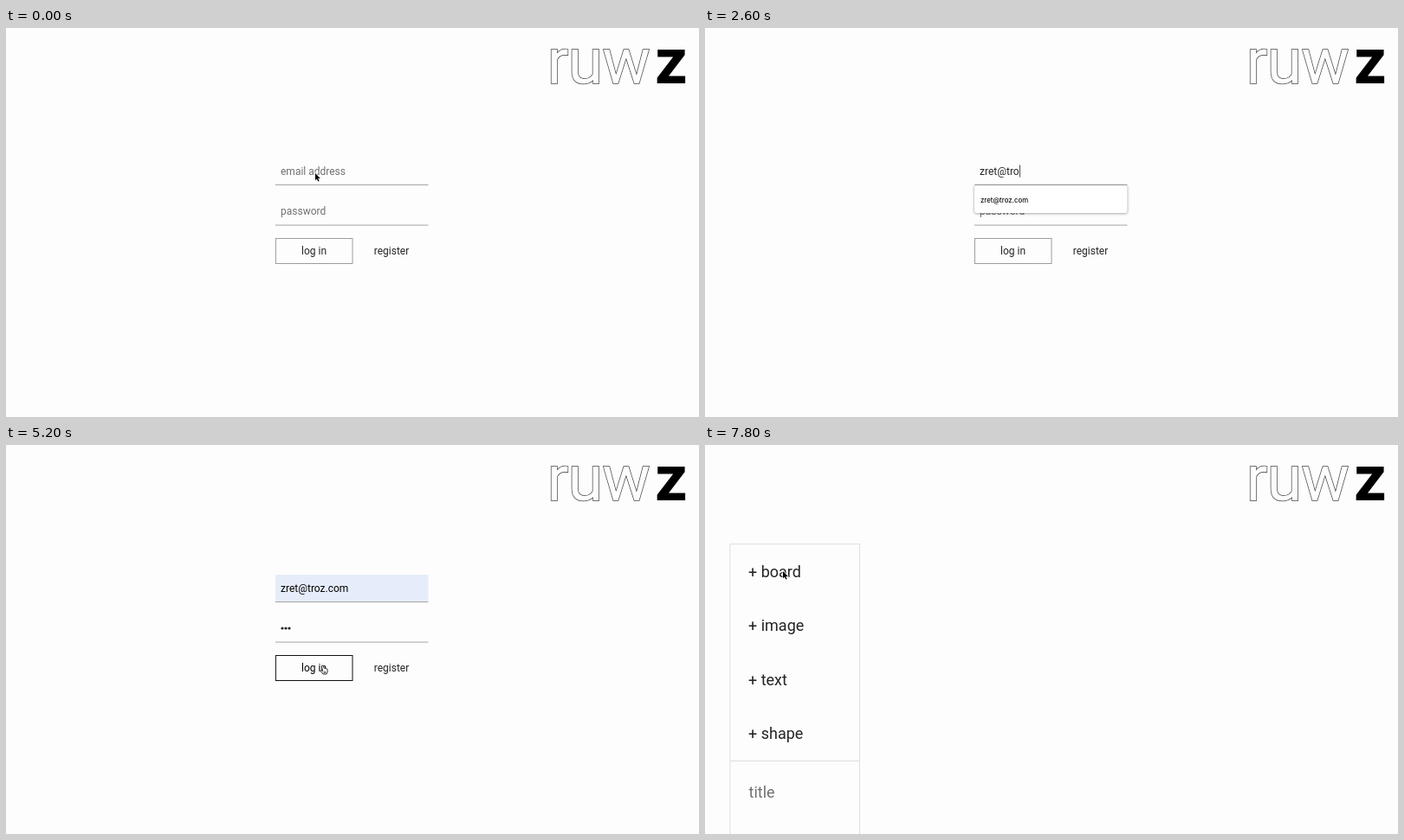
Animation, 800 px wide and 450 px high, one loop 8000 ms. Source, as an HTML page with a canvas:

```html
<!DOCTYPE html>
<html lang="en">
<head>
<meta charset="utf-8">
<title>Board sign-in</title>
<style>
  html, body { margin: 0; width: 100%; height: 100%; overflow: hidden; background: #fdfdfd; }
  canvas { display: block; width: 800px; height: 450px; }
</style>
</head>
<body>
<canvas id="stage"></canvas>
<script>
const LOOP = 8000, STEP = 200;
const PAPER = '#fdfdfd', INK = '#242424', HINT = '#707070', LINE = '#9c9c9c';
const UI = 'Roboto, sans-serif', SYSTEM = 'Inter, sans-serif';
const USER = 'zret@troz.com', OTHER = 'zret@quofi.com';

const canvas = document.getElementById('stage');
const ctx = canvas.getContext('2d');
const ratio = window.devicePixelRatio || 1;
canvas.width = 800 * ratio;
canvas.height = 450 * ratio;

// time, x, y, shape ('' hides the pointer)
const pointer = [
  [0, 357, 168, 'arrow'], [1000, 357, 171, 'beam'], [1200, 0, 0, ''],
  [2800, 372, 204, 'arrow'], [3000, 369, 200, 'arrow'],
  [3200, 369, 202, 'beam'], [3400, 366, 207, 'beam'], [3600, 361, 212, 'beam'],
  [4200, 0, 0, ''], [4800, 367, 233, 'arrow'], [5000, 366, 252, 'hand'],
  [5200, 367, 260, 'hand'], [5600, 352, 258, 'arrow'], [5800, 290, 254, 'arrow'],
  [6000, 205, 246, 'arrow'], [6200, 145, 236, 'hand'], [6400, 126, 232, 'hand'],
  [6800, 126, 227, 'arrow'], [7000, 121, 206, 'arrow'], [7200, 111, 176, 'arrow'],
  [7400, 104, 155, 'arrow'], [7800, 90, 146, 'arrow']
];

function text(str, x, y, size, color = INK, weight = 400, family = UI, align = 'left') {
  ctx.font = `${weight} ${size}px ${family}`;
  ctx.textAlign = align;
  ctx.fillStyle = color;
  ctx.fillText(str, x, y);
}

function outline(str, x, y, size, color, width, spacing = 0) {
  ctx.font = `400 ${size}px ${UI}`;
  ctx.textAlign = 'left';
  ctx.letterSpacing = spacing + 'px';
  ctx.lineWidth = width * 2;
  ctx.lineJoin = 'miter';
  ctx.miterLimit = 3;
  ctx.strokeStyle = color;
  ctx.strokeText(str, x, y);
  ctx.fillStyle = PAPER;
  ctx.fillText(str, x, y);
  ctx.letterSpacing = '0px';
}

function box(x, y, w, h, color, width = 1) {
  ctx.lineWidth = width;
  ctx.strokeStyle = color;
  ctx.strokeRect(x, y, w, h);
}

function bar(x, y, w, h, color) {
  ctx.fillStyle = color;
  ctx.fillRect(x, y, w, h);
}

function card(x, y, w, h, r, blur) {
  ctx.save();
  ctx.shadowColor = 'rgba(0,0,0,.45)';
  ctx.shadowBlur = blur * ratio;
  ctx.shadowOffsetY = 0.5 * ratio;
  ctx.fillStyle = '#fff';
  ctx.beginPath();
  ctx.roundRect(x, y, w, h, r);
  ctx.fill();
  ctx.restore();
}

function caret(str, top) {
  ctx.font = `400 12px ${UI}`;
  bar(317.4 + ctx.measureText(str).width, top, 0.8, 14, '#222');
}

function menu(rows, active) {
  card(311, 182, 176.5, 10 + 22 * rows.length, 2, 3);
  if (active) bar(311, 188, 176.5, 21, '#ececec');
  rows.forEach((row, i) => text(row, 318, 201.5 + i * 21.5, 7.8, '#111', 500, SYSTEM));
}

function login(t) {
  const typed = t < 1200 ? 0 : t < 2800 ? Math.min(8, (t - 1000) / STEP) : USER.length;
  const filled = t >= 2800, secret = t >= 4400, hover = t >= 5000;
  const email = USER.slice(0, typed);

  if (filled) bar(311, 150, 176.5, 31, '#e6edfa');
  if (typed) text(email, 317, 170, 12, filled ? '#000' : INK);
  else text('email address', 317, 170, 12, HINT);
  bar(311, 181, 176.5, 0.9, LINE);

  if (secret) {
    ctx.fillStyle = INK;
    for (let i = 0; i < 3; i++) {
      ctx.beginPath();
      ctx.arc(319 + i * 4, 212, 1.6, 0, Math.PI * 2);
      ctx.fill();
    }
  } else text('password', 317, 216.3, 12, HINT);
  bar(311, 227.6, 176.5, 0.9, LINE);

  box(311.4, 243.5, 88.6, 29, hover ? '#111' : LINE);
  text('log in', 355.5, 262.3, 12, hover ? '#000' : INK, 400, UI, 'center');
  text('register', 445, 262.3, 12, INK, 400, UI, 'center');

  if (t >= 1200 && t < 3200) menu(t < 2200 ? [OTHER, USER] : [USER], filled);
  if (t >= 800 && t < 2800 || t >= 3200 && t < 3800) caret(email, 158.5);
  else if (t >= 3800 && t < 4400) caret('', 205);
  else if (t >= 4400 && t < 5000) bar(330.5, 205, 0.8, 14, '#222');
}

function welcome(t) {
  outline('welcome', 34.5, 165.8, 50, '#777', 0.55);
  box(34.7, 212.4, 731.2, 28.6, '#4c4c4c', 0.9);
  box(34.7, 247.6, 731.2, 12.8, '#4c4c4c', 0.9);
  text('+ new board', 40.5, 235, 24, t >= 6200 ? '#e24b25' : INK, 500);
  card(29.5, 268, 26.5, 10, 1.5, 1.5);
  text('logout', 42.7, 275.3, 6.3, '#111', 400, SYSTEM, 'center');
  if (t >= 6600) {
    ctx.beginPath();
    ctx.arc(126, 227.7, 18.3, 0, Math.PI * 2);
    ctx.lineWidth = 1.1;
    ctx.strokeStyle = '#111';
    ctx.stroke();
  }
}

function board() {
  box(28.9, 114.6, 149.6, 360, '#dedfda');
  bar(29, 365, 149.5, 1, '#dedfda');
  ['board', 'image', 'text', 'shape'].forEach((name, i) =>
    text('+ ' + name, 50, 152.5 + i * 62.6, 18));
  text('title', 50.5, 408.3, 18, HINT);
}

function logo() {
  outline('ruw', 624.5, 63.6, 74, '#444', 0.7, -1);
  text('z', 749, 63.6, 74, '#000', 700);
}

const shapes = {
  arrow() {
    const p = new Path2D('M0 0V8.2L1.9 6.5L3.2 9.6L4.6 9L3.3 6H5.9Z');
    ctx.lineWidth = 1.2;
    ctx.strokeStyle = '#fff';
    ctx.stroke(p);
    ctx.fillStyle = '#000';
    ctx.fill(p);
  },
  beam() {
    ctx.lineWidth = 0.9;
    ctx.strokeStyle = '#222';
    ctx.stroke(new Path2D('M-2.3 -4.8Q0 -4.8 0 -3.6Q0 -4.8 2.3 -4.8M0 -3.6V3.6M-2.3 4.8Q0 4.8 0 3.6Q0 4.8 2.3 4.8M-1.2 1.4H1.2'));
  },
  hand() {
    const p = new Path2D('M-2.2 -4.6Q-1.4 -5.4 -.7 -4.4L.2 -1.8Q1.1 -2.5 1.7 -1.5Q2.6 -2 3 -1Q4.1 -1.2 4.1 .1V2.2L3 5H-1L-3.4 1.8Q-3.9 .5 -2.8 .5L-1.4 1.5L-2.6 -3.4Z');
    ctx.fillStyle = '#fff';
    ctx.fill(p);
    ctx.lineWidth = 0.9;
    ctx.lineJoin = 'round';
    ctx.strokeStyle = '#111';
    ctx.stroke(p);
    ctx.stroke(new Path2D('M.2 2V3.8M1.6 2V3.8'));
  }
};

function drawPointer(t) {
  const [, x, y, shape] = pointer.filter(p => p[0] <= t).pop();
  if (!shape) return;
  ctx.save();
  ctx.translate(x, y);
  shapes[shape]();
  ctx.restore();
}

function draw(now) {
  const t = Math.floor((now % LOOP) / STEP) * STEP;
  ctx.setTransform(ratio, 0, 0, ratio, 0, 0);
  bar(0, 0, 800, 450, PAPER);
  logo();
  if (t < 5600) login(t);
  else if (t < 6800) welcome(t);
  else board();
  drawPointer(t);
}

const start = performance.now();
function tick() {
  draw(performance.now() - start);
  requestAnimationFrame(tick);
}
tick();
</script>
</body>
</html>
```
